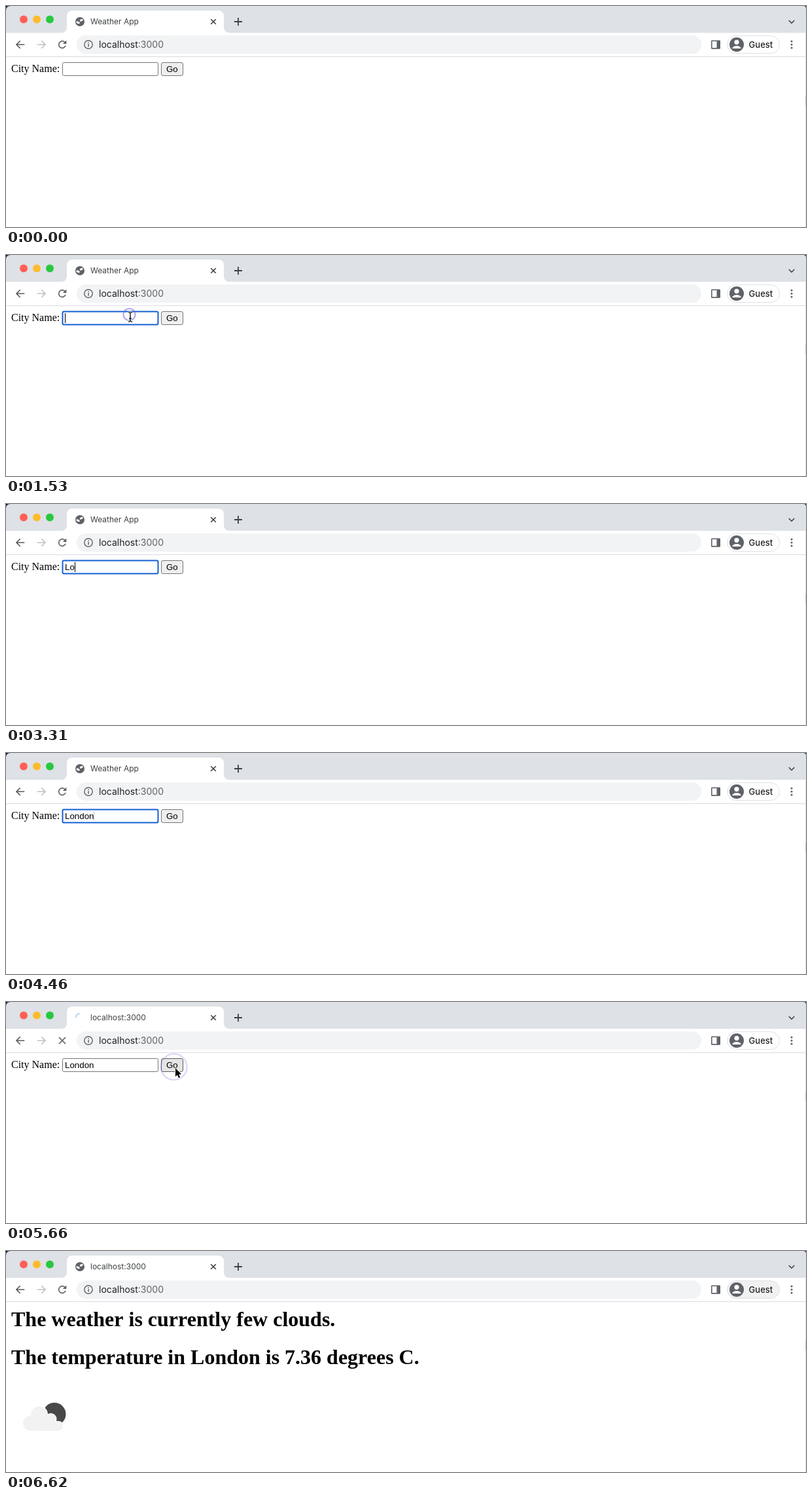
An HTML page with a canvas for the animation above (9350 ms loop, 1223 px wide and 338 px high).

```html
<!DOCTYPE html>
<html lang="en">
<head>
<meta charset="utf-8">
<title>Weather App</title>
<style>
  html, body { margin: 0; width: 100%; height: 100%; overflow: hidden; background: #fff; }
  canvas { display: block; width: 1223px; height: 338px; }
</style>
</head>
<body>
<canvas id="stage"></canvas>
<script>
const W = 1223, H = 338, LOOP = 9350, TAU = Math.PI * 2;
const canvas = document.getElementById('stage');
const ctx = canvas.getContext('2d');
const dpr = window.devicePixelRatio || 1;
canvas.width = W * dpr;
canvas.height = H * dpr;

const UI = 'Inter, sans-serif';
const FORM = '13.333px "Liberation Sans", Arial, sans-serif';
const SERIF = '"Liberation Serif", "Times New Roman", serif';
const GRAY = '#5f6368', INK = '#202124';

// Moments at which the state changes
const FOCUS = 1450, PRESS = 5020, RELEASE = 5420, SUBMIT = 5500, LOADED = 5980;
const KEYS = [2980, 3310, 3560, 3640, 3800, 3960];

const within = (v, a, b) => v >= a && v < b;
const mix = (a, b, f) => a + (b - a) * f;
const progress = (t, a, b) => Math.min(1, Math.max(0, (t - a) / (b - a)));
const easeIn = (f, p) => f ** p;
const easeOut = (f, p) => 1 - (1 - f) ** p;

// Motion advances in 80 ms ticks, restarting when typing ends
function tick(t) {
  const base = t < 4460 ? 650 : 4460;
  return base + Math.floor((t - base) / 80) * 80;
}

function pointerAt(t) {
  if (t < 1370) {
    const f = progress(t, 650, 1210);
    return [mix(834, 204, easeOut(f, 2.57)), mix(57, 95, easeIn(f, 2.57))];
  }
  if (t < 4460) return [190, 94.5];
  if (t < 6060) {
    const f = progress(t, 4620, PRESS);
    return [mix(196, 259, f), mix(99, 101, f) + 27 * Math.sin(Math.PI * f)];
  }
  const f = easeOut(progress(t, 6060, 6540), 2.3);
  return [mix(259, 1168, f), mix(101, 68, f)];
}

function text(str, x, y, font, color) {
  ctx.font = font;
  ctx.fillStyle = color;
  ctx.fillText(str, x, y);
}

function rect(x, y, w, h, color) {
  ctx.fillStyle = color;
  ctx.fillRect(x, y, w, h);
}

function ellipse(x, y, rx, ry, turn, color) {
  ctx.beginPath();
  ctx.ellipse(x, y, rx, ry, turn, 0, TAU);
  ctx.fillStyle = color;
  ctx.fill();
}

const disc = (x, y, r, color) => ellipse(x, y, r, r, 0, color);

function arc(x, y, r, from, to, color, width) {
  ctx.beginPath();
  ctx.arc(x, y, r, from, to);
  ctx.strokeStyle = color;
  ctx.lineWidth = width;
  ctx.stroke();
}

function box(x, y, w, h, r, fill, stroke, width = 1) {
  ctx.beginPath();
  ctx.roundRect(x, y, w, h, r);
  if (fill) { ctx.fillStyle = fill; ctx.fill(); }
  if (stroke) { ctx.strokeStyle = stroke; ctx.lineWidth = width; ctx.stroke(); }
}

// Each line is a flat list of x, y pairs
function lines(color, width, ...list) {
  ctx.beginPath();
  for (const p of list) {
    ctx.moveTo(p[0], p[1]);
    for (let i = 2; i < p.length; i += 2) ctx.lineTo(p[i], p[i + 1]);
  }
  ctx.strokeStyle = color;
  ctx.lineWidth = width;
  ctx.stroke();
}

function cross(x, y, r, color, width) {
  lines(color, width, [x - r, y - r, x + r, y + r], [x + r, y - r, x - r, y + r]);
}

function corner(x, size) {
  ctx.beginPath();
  ctx.moveTo(x, 0);
  ctx.lineTo(x + size, 0);
  ctx.quadraticCurveTo(x, 0, x, Math.abs(size));
  ctx.fillStyle = '#10203c';
  ctx.fill();
}

function globe(x, y) {
  disc(x, y, 7, GRAY);
  ellipse(x + 2.2, y - 2.3, 2.7, 1.6, -0.5, '#fff');
  ellipse(x - 2.9, y + 1.3, 2.9, 1.6, 0.45, '#fff');
}

function drawTabs(t) {
  rect(0, 0, W, 41, '#dee1e6');
  corner(0, 7);
  corner(W, -4);
  ['#ff5f57', '#febc2e', '#28c840'].forEach((c, i) => disc(27 + i * 20, 20.4, 6, c));

  ctx.beginPath();
  ctx.moveTo(85, 41);
  ctx.arcTo(93, 41, 93, 33, 8);
  ctx.arcTo(93, 7, 101, 7, 8);
  ctx.arcTo(333, 7, 333, 15, 8);
  ctx.arcTo(333, 41, 341, 41, 8);
  ctx.lineTo(341, 41);
  ctx.fillStyle = '#fff';
  ctx.fill();

  if (within(t, SUBMIT, LOADED)) {
    const a = Math.PI - (t - 5660) / 1568 * TAU;
    arc(113, 24, 6.5, a, a + Math.PI / 2, '#adcaf5', 1.6);
  } else {
    globe(113, 24);
  }
  text(t < SUBMIT ? 'Weather App' : 'localhost:3000', 129, 28, '12px ' + UI, '#3c4043');
  cross(317, 24, 3.8, '#3c4043', 1.6);
  lines('#3c4043', 1.8, [349, 24, 361, 24], [355, 18, 355, 30]);
  lines('#3c4043', 1.6, [1196.8, 22, 1201, 26.2, 1205.2, 22]);
}

function arrowIcon(x, dir, color) {
  const tip = x + dir * 6, back = x + dir * 0.3;
  lines(color, 1.6, [x - dir * 6.3, 59, tip, 59], [back, 53.2, tip, 59, back, 64.8]);
}

function drawGuest(hover) {
  box(1102.5, 45.5, 80, 27, 13.5, hover ? '#f1f1f2' : '#fff', '#dfe1e5');
  disc(1117, 59, 11, GRAY);
  disc(1117, 55.3, 3.6, '#fff');
  ctx.beginPath();
  ctx.ellipse(1117, 65, 6.8, 4, 0, Math.PI, 0);
  ctx.fill();
  text('Guest', 1135.6, 64, '500 13px ' + UI, INK);
}

function drawToolbar(t) {
  rect(0, 77, W, 1, '#dadce0');
  arrowIcon(22, -1, '#55585d');
  arrowIcon(54, 1, '#bdc1c6');

  if (within(t, SUBMIT, LOADED)) {
    cross(86, 59, 5, GRAY, 1.7);
  } else {
    arc(86, 59, 5.3, 0.35, Math.PI * 1.78, GRAY, 1.7);
    ctx.beginPath();
    ctx.moveTo(92.3, 52.5);
    ctx.lineTo(92.3, 58);
    ctx.lineTo(86.8, 58);
    ctx.fillStyle = GRAY;
    ctx.fill();
  }

  box(108, 45, 955, 28, 14, within(t, 650, 1130) ? '#e8eaeb' : '#f1f3f4');
  arc(126, 59, 6.2, 0, TAU, GRAY, 1.4);
  rect(125.3, 58, 1.5, 4.4, GRAY);
  rect(125.3, 55.4, 1.5, 1.5, GRAY);
  text('localhost', 142, 64, '14px ' + UI, INK);
  text(':3000', 142 + ctx.measureText('localhost').width, 64, '14px ' + UI, GRAY);

  box(1078.8, 53.3, 12.4, 11.6, 0.5, null, GRAY, 1.6);
  rect(1086.5, 53, 5, 12, GRAY);
  drawGuest(t >= 6460);
  for (let i = -1; i <= 1; i++) disc(1201, 59 + i * 5, 1.55, GRAY);
}

function drawForm(t) {
  text('City Name:', 8, 101, '16px ' + SERIF, '#000');
  const focused = within(t, FOCUS, PRESS);
  box(86.5, 86.5, 146, 20, 2, '#fff', focused ? '#1560d0' : '#767676', focused ? 2 : 1);

  const typed = 'London'.slice(0, KEYS.filter(k => t >= k).length);
  text(typed, 90, 101, FORM, '#000');
  const caretX = Math.round(90 + ctx.measureText(typed).width);
  if (within(t, FOCUS, 1930) || within(t, 2490, 4460)) rect(caretX, 89, 1, 15, '#000');
  else if (within(t, 4460, 4620)) rect(caretX, 89, 1, 15, '#c4c4c4');

  let fill = '#efefef', edge = '#767676';
  if (within(t, PRESS, RELEASE)) { fill = '#f5f5f5'; edge = '#a0a0a0'; }
  else if (t >= RELEASE) { fill = '#e5e5e5'; edge = '#5c5c5c'; }
  box(237.5, 86.5, 33, 20, 2.5, fill, edge);
  text('Go', 245, 101, FORM, '#000');
}

function cloud(grow, color) {
  disc(50.5, 250, 12.5 + grow, color);
  disc(68.5, 257, 8 + grow, color);
  disc(37.5, 263.5, 11.5 + grow, color);
  box(37 - grow, 261 - grow, 50 + grow * 2, 14 + grow * 2, 7 + grow, color);
  rect(38, 252, 24, 20, color);
}

function drawReport() {
  const bold = 'bold 32px ' + SERIF;
  text('The weather is currently few clouds.', 8, 115, bold, '#000');
  text('The temperature in London is 7.36 degrees C.', 8, 173, bold, '#000');
  disc(74, 249.5, 17.5, '#484848');
  cloud(1, '#fff');
  cloud(0, '#f2f2f2');
}

// Click ring swells, then shrinks as it fades
function drawRing(x, y, age, size) {
  if (!within(age, 0, 880)) return;
  const f = age / 880;
  const r = size * Math.sin(Math.PI * f) ** 0.6;
  arc(x, y, r, 0, TAU, `rgba(112, 92, 222, ${0.58 * (1 - f * f)})`, 2);
}

function drawBeam() {
  for (const [color, width] of [['#fff', 3], ['#000', 1.3]]) {
    lines(color, width, [0, -6, 0, 6.5], [-1.8, 2.5, 1.8, 2.5],
      [-3.2, -7.5, 0, -6, 3.2, -7.5], [-3.2, 8, 0, 6.5, 3.2, 8]);
  }
}

function drawArrow() {
  const shape = [0, 0, 0, 13.2, 3, 10.5, 5, 15.2, 7.2, 14.3, 5.2, 9.8, 9.2, 9.5, 0, 0];
  lines('#fff', 2, shape);
  ctx.fillStyle = '#000';
  ctx.fill();
}

function drawPointer([x, y]) {
  ctx.save();
  ctx.translate(x, y);
  ctx.lineJoin = 'round';
  if (within(x, 86, 233) && within(y, 86, 108)) drawBeam();
  else drawArrow();
  ctx.restore();
}

function draw(t) {
  ctx.setTransform(dpr, 0, 0, dpr, 0, 0);
  rect(0, 0, W, H, '#fff');
  drawTabs(t);
  drawToolbar(t);
  if (t < LOADED) drawForm(t);
  else drawReport();

  rect(1222, 41, 1, H - 41, '#e4e4e6');
  rect(1222, 137, 1, 15, '#c4c4c8');

  const step = tick(t);
  drawRing(188.5, 91, step - FOCUS, 19.5);
  drawRing(256.7, 99.2, step - PRESS, 23.5);
  if (within(t, 650, 3060) || within(t, 4620, 6620)) drawPointer(pointerAt(step));
}

function frame() {
  draw(performance.now() % LOOP);
  requestAnimationFrame(frame);
}
frame();
</script>
</body>
</html>
```
